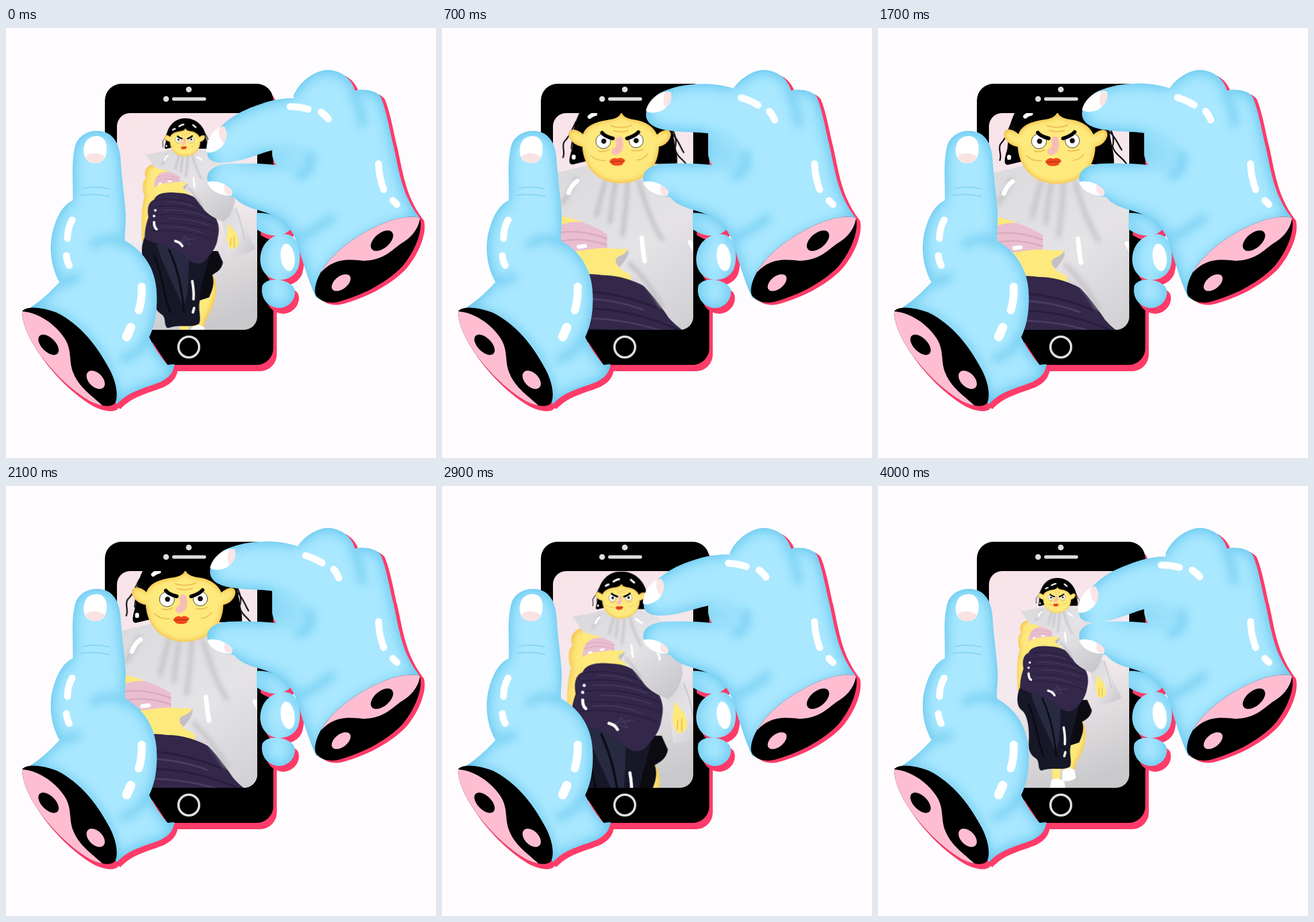
Write an HTML page without scripts that moves like this. It is 748 by 748 pixels and loops after 4.1 s.

```html
<!DOCTYPE html>
<html lang="en">
<head>
<meta charset="utf-8">
<title>Pinch to zoom</title>
<style>
html, body { margin: 0; width: 100%; height: 100%; overflow: hidden; background: #fefcfe; }
svg { display: block; width: 100%; height: 100%; }

/* One held value per 100 ms, shared by picture and finger */
:root {
  --pinch: linear(
    .05 0% 2.4%, .12 2.44% 4.84%, .27 4.88% 7.28%, .43 7.32% 9.72%, .61 9.76% 12.16%,
    .78 12.2% 14.6%, .905 14.63% 17.03%, .98 17.07% 19.47%, 1 19.51% 53.6%,
    .945 53.66% 56.06%, .85 56.1% 58.5%, .74 58.54% 60.94%, .63 60.98% 63.38%,
    .515 63.41% 65.81%, .4 65.85% 68.25%, .29 68.29% 70.69%, .195 70.73% 73.13%,
    .12 73.17% 75.57%, .06 75.61% 78%, .025 78.05% 80.45%, .005 80.49% 82.9%, 0 82.93% 100%);
}
.zoom, .finger, .nail, .gleam { animation: 4.1s var(--pinch) infinite; }
.zoom { animation-name: zoom; transform-origin: 312px 192.4px; }
.finger { animation-name: bend; }
.nail { animation-name: nail; transform-origin: 379px 127px; }
.gleam { animation-name: gleam; transform-origin: 536px 129px; }
.lid { opacity: 0; animation: blink 4.1s step-end infinite; }
.wisp { animation: sway .82s step-end infinite; transform-origin: 312px 165px; }

@keyframes zoom { from { transform: scale(.36); } to { transform: scale(1); } }
@keyframes bend {
  from { d: path("M350 222C349 206 360 190 371 178C383 163 402 149 435 137C470 123 500 118 535 128C575 138 600 170 600 230L520 245C522 225 505 211 480 211C450 214 425 232 385 237C364 239 351 235 350 222Z"); }
  to { d: path("M355 150C355 132 370 115 385 109C405 101 425 97 445 97C480 94 515 105 545 120C580 140 600 170 600 230L520 245C522 215 505 195 480 186C450 178 425 182 395 177C372 174 356 166 355 150Z"); }
}
@keyframes nail { from { transform: translate(-13px, 70px) rotate(-20deg); } to { transform: none; } }
@keyframes gleam { from { transform: translate(-26.5px, 12px) rotate(-17deg); } to { transform: none; } }
@keyframes blink { 0%, 36.58% { opacity: 0; } 31.7% { opacity: 1; } }
@keyframes sway { 50% { transform: rotate(2.5deg); } }

.blue { fill: #a9e8ff; }
.pink { fill: #ff3b69; }
.rose { fill: #ffbdd2; }
.skin { fill: #fee97c; }
.line { fill: none; stroke-linecap: round; stroke-linejoin: round; }
.shine { fill: none; stroke: #fff; stroke-linecap: round; }
.shade { fill: none; stroke: #6cc9ef; stroke-width: 14; stroke-linecap: round; filter: blur(8px); opacity: .75; }
.fold { fill: none; stroke: #bdbcc1; stroke-width: 6; stroke-linecap: round; filter: blur(4px); }
</style>
</head>
<body>
<svg viewBox="0 0 748 748">
<defs>
  <filter id="cool" color-interpolation-filters="sRGB">
    <feFlood flood-color="#4fbbe9"/>
    <feComposite in2="SourceAlpha" operator="out"/>
    <feGaussianBlur stdDeviation="13"/>
    <feComposite in2="SourceAlpha" operator="in" result="rim"/>
    <feMerge><feMergeNode in="SourceGraphic"/><feMergeNode in="rim"/></feMerge>
  </filter>
  <filter id="warm" color-interpolation-filters="sRGB">
    <feFlood flood-color="#eda52c"/>
    <feComposite in2="SourceAlpha" operator="out"/>
    <feGaussianBlur stdDeviation="5"/>
    <feComposite in2="SourceAlpha" operator="in" result="rim"/>
    <feMerge><feMergeNode in="SourceGraphic"/><feMergeNode in="rim"/></feMerge>
  </filter>
  <linearGradient id="room" x1=".35" y1="0" x2=".6" y2="1">
    <stop offset="0" stop-color="#f8e3e9"/>
    <stop offset=".5" stop-color="#f3eaee"/>
    <stop offset="1" stop-color="#c9c9cb"/>
  </linearGradient>
  <linearGradient id="cloth" x1="0" y1="0" x2="1" y2="1">
    <stop offset="0" stop-color="#d9d8db"/>
    <stop offset=".5" stop-color="#e5e3e6"/>
    <stop offset="1" stop-color="#c4c3c7"/>
  </linearGradient>
  <path id="left" d="M43 486C62 474 80 456 93 442C75 410 75 372 83 348C91 320 104 305 116 300C118 270 112 235 121 203C127 186 145 178 160 179C182 180 196 195 199 225C202 270 206 290 208 320C209 340 206 355 207 370C235 385 260 415 262 460C264 500 256 523 249 538C258 556 270 574 281 586L293 585C291 600 283 608 270 615C245 626 215 630 193 654L120 560Z"/>
  <path id="leftCut" d="M28 493C34 484 58 484 88 495C130 516 158 553 178 590C192 614 196 640 190 652C184 660 168 659 150 651C104 628 28 548 28 493Z"/>
  <path id="palm" d="M350 262C350 246 365 238 387 236C430 234 470 237 516 244L520 200L500 118C510 93 538 73 560 73C585 74 602 90 607 109C626 105 645 110 652 120C663 148 667 178 674 205C684 250 688 290 720 331L640 400L540 470C526 440 516 405 508 380C502 358 488 334 462 325C444 316 412 314 397 294C375 292 352 284 350 262Z"/>
  <path id="rightCut" d="M720 331C725 348 716 382 690 414C660 446 612 468 575 477C556 480 541 472 538 462C535 446 546 422 566 400C590 374 630 348 672 334C694 328 713 327 720 331Z"/>
  <g id="curled">
    <path d="M436 322C455 320 486 330 497 348C486 362 462 368 436 350Z"/>
    <path d="M446 384C455 362 482 353 497 362C512 374 514 400 508 418C500 438 474 444 456 432C440 420 440 398 446 384Z"/>
    <path d="M446 448C455 432 490 436 501 452C507 468 494 487 474 487C452 485 442 466 446 448Z"/>
  </g>
  <clipPath id="screen"><rect x="193" y="148" width="244" height="377" rx="23"/></clipPath>
  <clipPath id="inLeft"><use href="#left"/></clipPath>
  <clipPath id="inLeftCut"><use href="#leftCut"/></clipPath>
  <clipPath id="inPalm"><use href="#palm"/></clipPath>
  <clipPath id="inRightCut"><use href="#rightCut"/></clipPath>
</defs>

<!-- phone -->
<rect class="pink" x="180" y="108" width="291" height="489" rx="29"/>
<rect x="172" y="97" width="293" height="489" rx="29"/>
<g fill="#dedcde">
  <circle cx="318" cy="107" r="5"/>
  <circle cx="278.500" cy="123.500" r="5"/>
  <rect x="289" y="120.500" width="59" height="6" rx="3"/>
</g>
<circle cx="318" cy="555" r="18" fill="none" stroke="#dedcde" stroke-width="4"/>

<!-- picture on the screen -->
<g clip-path="url(#screen)">
  <rect x="193" y="148" width="244" height="377" fill="url(#room)"/>
  <g class="zoom">
    <!-- body, laid out at the small size -->
    <g transform="translate(312 192.400) scale(2.7778) translate(-312 -192.400)">
      <g class="skin">
        <path filter="url(#warm)" d="M264 232C250 235 244 245 249 255C242 262 243 275 247 285C241 302 241 330 243 356L256 358C258 330 262 300 270 275L272 240Z"/>
        <path d="M261 236L305 244L318 268L318 284L262 288Z"/>
        <path filter="url(#warm)" d="M355 408C366 424 362 450 351 470C344 483 341 490 342 498L322 500L322 420Z"/>
        <path d="M302 480L319 480L316 516L304 516Z"/>
      </g>
      <path fill="#fff" d="M302 511Q312 506 324 514L326 526L299 526ZM321 495Q332 486 342 494L344 508Q332 516 320 512Z"/>
      <path fill="url(#cloth)" d="M372 310L394 302C402 322 414 350 424 368C408 378 394 379 379 382C377 360 374 345 371 325Z"/>
      <path class="skin" d="M380 328C388 336 398 346 397 360C394 370 384 371 381 364L378 352Z"/>
      <path class="line" stroke="#e0ab3a" d="M385 352L384 364M390 350L390 366"/>
      <path class="line" stroke="#b9b8bc" d="M393 306C400 322 402 334 406 352"/>

      <path fill="#0c0b12" d="M340 372L364 372L372 390C370 402 362 406 355 410C360 424 354 436 350 446L332 452L318 400Z"/>
      <path fill="#161727" d="M247 350C240 366 241 384 250 390C261 398 264 426 262 448C262 462 266 468 275 474C282 480 277 492 284 495C304 488 322 496 334 488C338 478 332 466 335 452C334 430 344 412 350 380L300 354Z"/>
      <path fill="#272a40" d="M266 362C284 352 312 368 318 388C316 420 318 445 308 462C296 430 276 396 266 362Z"/>
      <path class="line" stroke="#0b0b14" stroke-width="3" d="M286 370C300 400 306 430 310 470M262 380C276 410 276 440 288 470"/>
      <path fill="#33274a" d="M262 290C266 279 282 277 300 279C322 279 342 294 354 309C364 322 368 334 364 350C362 365 356 373 348 382C340 394 328 396 314 384C300 364 268 364 247 352C247 338 250 326 253 318C250 302 254 293 262 290Z"/>
      <g class="line" stroke="#281d3c" stroke-width="1.200">
        <path d="M264 291Q302 284 344 304M260 302Q310 294 355 317M262 315Q312 308 361 329M256 329Q310 324 363 341M258 340Q310 336 358 354"/>
      </g>
      <g class="line" stroke="#4a3c63" stroke-width="1.200">
        <path d="M282 294Q304 293 326 301M276 307Q310 304 345 317M286 320Q318 319 350 331M275 334Q306 330 338 343M304 360L312 348L320 362L302 356L328 352"/>
      </g>
      <g class="shine" stroke-width="4">
        <path d="M264 307v.1M262 316v.1M262 326Q262 334 266 337M296 356Q304 358 307 364M323 420Q326 436 325 449M326 463L324 470"/>
      </g>

      <path fill="#e9bfd0" d="M264 257C270 245 282 244 292 246L306 254L306 262C296 261 288 264 278 264C270 265 266 268 261 271Z"/>
      <path class="line" stroke="#d9a9c0" d="M266 254Q282 248 303 256M264 260Q284 253 303 260"/>
      <path class="shine" stroke-width="2.500" d="M270 265l3 -1M285 261l4 -.5"/>

      <path fill="url(#cloth)" d="M248 218C264 216 280 212 292 209L333 209C352 213 362 219 371 232C384 250 392 274 391 294C388 306 382 319 372 325C360 320 350 315 342 306C332 291 322 280 313 276C308 273 307 268 311 267C315 265 317 263 316 262C310 263 306 262 303 262L303 253C297 249 292 247 286 245C276 241 268 241 262 238C258 232 254 224 248 218Z"/>
      <path fill="#b4b3b8" opacity=".7" d="M311 274C307 271 308 268 311 267C315 265 317 263 316 262C318 266 314 270 311 274Z"/>
    </g>

    <!-- cape folds and gloss -->
    <path class="fold" d="M284 266C278 290 272 310 268 328M302 268C296 296 294 320 292 340M323 268C322 300 318 330 314 362M342 266C352 300 364 340 384 370"/>
    <path class="fold" d="M232 262Q220 290 208 306M326 412Q356 440 384 488"/>
    <g class="shine" stroke-width="8">
      <path d="M219 288Q224 274 234 267M348 367Q350 390 353 408M364 273L386 287"/>
      <path d="M433 375Q446 396 450 418"/>
    </g>

    <!-- head -->
    <path d="M226 238C216 238 222 222 226 206C224 150 256 102 312 102C366 102 402 146 404 190C408 210 412 226 410 237L365 237L260 230Z"/>
    <g class="wisp line" stroke="#111" stroke-width="2.500">
      <path d="M232 166C224 184 222 192 213 202C208 210 216 220 212 230M236 172C230 188 226 200 226 214"/>
      <path d="M396 164C408 178 412 192 408 206C412 220 424 224 432 236M402 180C414 190 418 204 424 212"/>
    </g>
    <g class="shine" stroke-width="7">
      <path d="M256 154Q260 150 266 149M284 138Q298 130 304 130M346 132L358 142M228 224v2"/>
    </g>
    <g class="skin" filter="url(#warm)">
      <path d="M250 207C238 208 222 200 219 187C218 174 232 172 248 188ZM370 207C384 208 396 200 399 187C400 174 386 174 372 188Z"/>
      <path d="M243 205C240 180 250 166 285 160C300 158 308 156 312 146C316 156 325 158 340 160C368 166 380 185 378 208C376 250 345 271 311 271C272 271 245 245 243 205Z"/>
    </g>
    <path class="line" stroke="#e3b04a" stroke-width="2" opacity=".7" d="M294 170Q312 176 330 169M298 178Q312 183 324 178M258 222Q268 232 284 231M340 230Q350 230 358 220M272 214Q280 217 290 212M330 213Q340 216 350 211"/>
    <g fill="#fff" stroke="#3a2f22">
      <circle cx="280" cy="197" r="13"/>
      <circle cx="338" cy="196" r="12.500"/>
    </g>
    <g fill="#161412">
      <circle cx="281" cy="197" r="4.500"/>
      <circle cx="338" cy="196" r="4.500"/>
    </g>
    <g class="lid">
      <g fill="#94908c">
        <circle cx="280" cy="197" r="13.500"/>
        <circle cx="338" cy="196" r="13.500"/>
      </g>
      <g fill="#fff">
        <ellipse cx="280" cy="197" rx="10" ry="5"/>
        <ellipse cx="338" cy="196" rx="10" ry="5"/>
      </g>
      <circle cx="281" cy="197" r="4"/>
      <circle cx="338" cy="196" r="4"/>
    </g>
    <path class="line" stroke="#000" stroke-width="6.500" d="M278 182Q282 188 297 192M322 192Q336 188 342 181"/>
    <path class="line" stroke="#f7c0b8" stroke-width="13" d="M308 195C310 206 309 212 301 215"/>
    <path class="line" stroke="#e39c98" stroke-width="8" stroke-dasharray="1 3" opacity=".35" style="stroke-linecap:butt" d="M308 195C310 206 309 212 301 215"/>
    <path fill="#f04a1c" d="M291 233C293 227 301 225 305 228C308 225 316 226 319 231L315 235C318 240 296 243 294 236Z"/>
    <path class="line" stroke="#b5300f" stroke-width="1.500" d="M293 234Q306 231 317 233"/>
  </g>
</g>

<!-- left hand -->
<g class="pink" transform="translate(6 9)">
  <path d="M249 538L281 586L293 585C291 600 283 608 270 615C245 626 215 630 193 654L120 600Z"/>
  <use href="#leftCut"/>
</g>
<use href="#left" class="blue" filter="url(#cool)"/>
<g clip-path="url(#inLeft)">
  <path class="shade" d="M152 376C172 364 190 364 205 374M95 440Q112 442 124 432M246 540Q232 566 204 576M43 486C130 490 190 590 192 645"/>
</g>
<path class="line" stroke="#79cdf0" stroke-width="2" opacity=".7" d="M134 279Q156 274 178 280M130 291Q155 287 180 293"/>
<use href="#leftCut"/>
<path class="rose" clip-path="url(#inLeftCut)" d="M28 493C52 494 84 512 102 540C116 562 108 580 118 602C128 626 150 640 168 657L80 680L10 560Z"/>
<ellipse cx="74" cy="551" rx="12" ry="22" transform="rotate(-45 74 551)"/>
<ellipse class="rose" cx="156" cy="612" rx="12" ry="19" transform="rotate(-45 156 612)"/>
<path fill="#fff" d="M135 212C136 196 145 188 157 188C170 188 176 198 175 212C174 228 168 235 155 235C142 235 135 226 135 212Z"/>
<path fill="#f9e3e2" d="M138 224C145 216 165 216 172 225C168 233 162 235 155 235C147 235 141 231 138 224Z"/>
<g class="shine" stroke-width="12">
  <path d="M115 334Q107 348 107 366M105 396Q106 406 110 413"/>
  <path stroke-width="14" d="M236 450Q237 472 231 491"/>
  <path stroke-width="16" d="M217 521L210 537"/>
</g>

<!-- right hand -->
<use href="#curled" class="pink" transform="translate(7 10)"/>
<use href="#curled" class="blue" filter="url(#cool)"/>
<g class="pink" transform="translate(7 4)">
  <path d="M560 74C585 74 602 90 607 109C626 105 645 110 652 120C663 148 667 178 674 205C684 250 688 290 720 331L600 330Z"/>
  <use href="#rightCut"/>
</g>
<path fill="#a3e4fb" d="M463 170L530 170L530 262L490 256C476 248 462 234 463 214Z"/>
<g class="blue" filter="url(#cool)">
  <path d="M463 170L530 170L530 262L490 256C476 248 462 234 463 214Z" opacity=".6"/>
  <use href="#palm"/>
  <path class="finger" d="M350 222C349 206 360 190 371 178C383 163 402 149 435 137C470 123 500 118 535 128C575 138 600 170 600 230L520 245C522 225 505 211 480 211C450 214 425 232 385 237C364 239 351 235 350 222Z"/>
</g>
<path class="shade" d="M528 220C534 238 526 252 510 258"/>
<g clip-path="url(#inPalm)">
  <path class="shade" d="M606 112Q616 138 620 166M510 364Q540 352 566 330M720 331C660 330 540 400 538 465"/>
</g>
<use href="#rightCut"/>
<path class="rose" clip-path="url(#inRightCut)" d="M720 332C718 346 708 362 692 372C672 384 660 404 622 405C596 402 572 400 549 424L530 400L660 310L720 320Z"/>
<ellipse cx="654" cy="370" rx="23" ry="13" transform="rotate(-40 654 370)"/>
<ellipse class="rose" cx="583" cy="443" rx="19" ry="11" transform="rotate(-38 583 443)"/>
<path fill="#fff" d="M350 268C362 264 384 269 394 284L392 292C374 292 355 284 350 268Z"/>
<path fill="#fae4e4" d="M380 272Q394 279 394 288L390 292Q382 290 380 284Z"/>
<g class="nail">
  <path fill="#fff" d="M355 142C359 124 380 106 398 110C402 124 392 140 378 144C368 147 358 146 355 142Z"/>
  <path fill="#fae4e4" d="M390 109L398 110C402 122 396 132 389 138C384 130 384 118 390 109Z"/>
</g>
<g class="gleam">
  <path class="shine" stroke-width="12" d="M521 121Q538 126 550 134M570 145Q576 152 579 160"/>
</g>
<g class="shine" stroke-width="12">
  <path d="M648 236Q649 260 657 281M673 300L680 307"/>
</g>
<ellipse cx="490" cy="399" rx="12" ry="24" fill="#fff" transform="rotate(-8 490 399)"/>
</svg>
</body>
</html>
```
